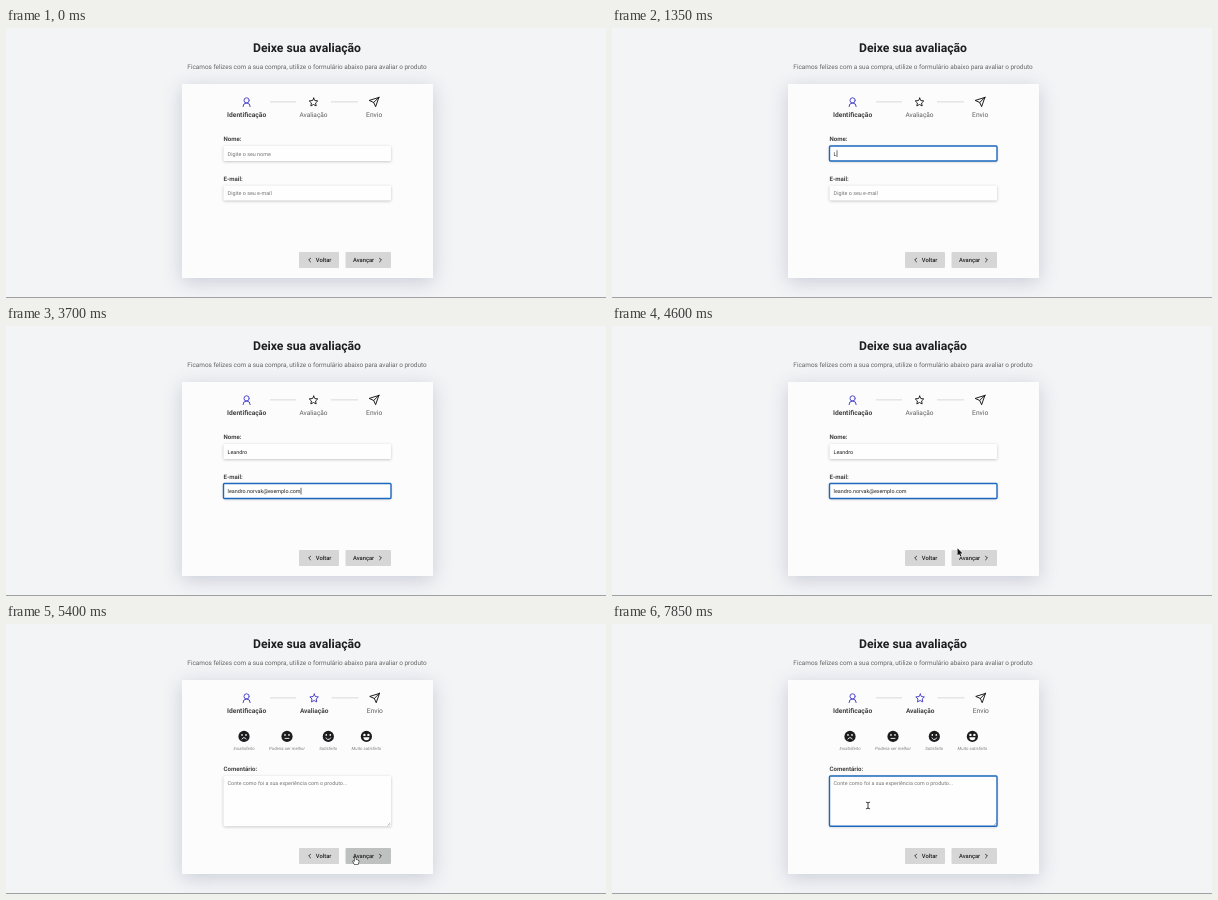
Write an HTML page with a canvas that moves like this. It is 600x270 px and loops after 8000 ms.

```html
<!DOCTYPE html>
<html lang="pt-BR">
<head>
<meta charset="utf-8">
<title>Avaliação</title>
<style>
html, body { margin: 0; width: 100%; height: 100%; overflow: hidden; background: #f3f4f6; }
canvas { display: block; width: 600px; height: 270px; }
</style>
</head>
<body>
<canvas id="stage"></canvas>
<script>
const LOOP = 8000, TICK = 50, W = 600, H = 270;
const FONT = 'Roboto, "Open Sans", sans-serif';
const BLUE = '#3b35c9', INK = '#1c1c1e', PAPER = '#fcfcfc', FOCUS = '#1c68bd';
const canvas = document.getElementById('stage');
const dpr = window.devicePixelRatio || 1;
canvas.width = W * dpr;
canvas.height = H * dpr;
const ctx = canvas.getContext('2d');
ctx.scale(dpr, dpr);
ctx.textRendering = 'geometricPrecision';

const NAME = 'Leandro', EMAIL = 'leandro.norvak@exemplo.com';
const KEYS = [1350, 1800, 1950, 2150, 2400, 2600, 2700];
const T = { nameFocus: 700, mailFocus: 2850, mailFill: 3700, blur: 4900, next: 5150, noteFocus: 6350 };

const FIELD = { x: 217.5, w: 167.5 };
const BACK = { x: 293, y: 224, w: 40, h: 16 };
const NEXT = { x: 339.5, y: 224, w: 45.5, h: 16 };

// Pointer stops: time, x, y
const PATH = [
  [100, 406, 256], [200, 345, 162], [300, 283, 124], [450, 283, 124], [650, 267, 126],
  [3950, 267, 126], [4800, 358.3, 238], [5350, 358.3, 238], [5600, 271, 190],
  [5800, 271, 190], [6250, 256, 181.5]
];

function text(str, x, y, size, color, style = '', align = 'left') {
  ctx.font = `${style} ${size}px ${FONT}`;
  ctx.textAlign = align;
  ctx.fillStyle = color;
  ctx.fillText(str, x, y);
  return ctx.measureText(str).width;
}

function box(x, y, w, h, fill, radius = 0, shadow) {
  ctx.save();
  if (shadow) {
    ctx.shadowColor = shadow.color;
    ctx.shadowBlur = shadow.blur * dpr;
    ctx.shadowOffsetY = shadow.dy * dpr;
  }
  ctx.fillStyle = fill;
  ctx.beginPath();
  ctx.roundRect(x, y, w, h, radius);
  ctx.fill();
  ctx.restore();
}

function poly(points, closed) {
  ctx.beginPath();
  points.forEach(([x, y]) => ctx.lineTo(x, y));
  if (closed) ctx.closePath();
}

function stroke(color, width) {
  ctx.strokeStyle = color;
  ctx.lineWidth = width;
  ctx.stroke();
}

function at(x, y, scale, draw) {
  ctx.save();
  ctx.translate(x, y);
  ctx.scale(scale, scale);
  ctx.lineJoin = ctx.lineCap = 'round';
  draw();
  ctx.restore();
}

function userIcon(x, y) {
  at(x, y, 1, () => {
    ctx.beginPath();
    ctx.arc(0, -1.6, 2.6, 0, Math.PI * 2);
    stroke(BLUE, 0.9);
    ctx.beginPath();
    ctx.arc(0, 4.6, 3.6, Math.PI, 0);
    stroke(BLUE, 0.9);
  });
}

function starIcon(x, y, color) {
  const points = Array.from({ length: 10 }, (_, i) => {
    const r = i % 2 ? 2.2 : 4.5, a = i * Math.PI / 5 - Math.PI / 2;
    return [r * Math.cos(a), r * Math.sin(a)];
  });
  at(x, y + 0.3, 1, () => {
    poly(points, true);
    stroke(color, 0.9);
  });
}

function planeIcon(x, y) {
  at(x, y, 0.47, () => {
    poly([[10, -10], [3, 10], [-1, 1], [-10, -3]], true);
    stroke('#111', 2);
    poly([[10, -10], [-1, 1]]);
    stroke('#111', 2);
  });
}

function face(x, mood) {
  at(x, 112.4, 1, () => {
    const dot = (cx, cy, r) => {
      ctx.beginPath();
      ctx.arc(cx, cy, r, 0, Math.PI * 2);
      ctx.fill();
    };
    ctx.fillStyle = INK;
    dot(0, 0, 5.6);
    ctx.fillStyle = PAPER;
    const big = mood === 2;
    dot(-2, -1.5, big ? 1.2 : 0.85);
    dot(2, -1.5, big ? 1.2 : 0.85);
    ctx.beginPath();
    if (big) {
      ctx.arc(0, 0.8, 3, 0, Math.PI);
      ctx.fill();
      return;
    }
    if (mood < 0) ctx.arc(0, 3.7, 2.4, Math.PI * 1.15, Math.PI * 1.85);
    else if (mood > 0) ctx.arc(0, 0.6, 2.5, Math.PI * 0.12, Math.PI * 0.88);
    else { ctx.moveTo(-2, 2); ctx.lineTo(2, 2); }
    stroke(PAPER, 0.9);
  });
}

function field(y, h, focused) {
  box(FIELD.x, y, FIELD.w, h, '#fefefe', 1, { color: 'rgba(0,0,0,.24)', blur: 3, dy: 0.8 });
  if (!focused) return;
  ctx.beginPath();
  ctx.roundRect(FIELD.x, y, FIELD.w, h, 1);
  stroke(FOCUS, 1.4);
}

function caret(x, y, since) {
  if (since % 1000 < 500) box(x, y, 0.6, 6.8, '#111');
}

function input(label, y, hint, value, focused, since) {
  text(label, 217.5, y - 5, 6.1, '#444', 'bold');
  field(y, 15, focused);
  const w = text(value || hint, 221.6, y + 9.9, 5.4, value ? '#222' : '#757575');
  if (focused) caret(221.6 + (value ? w + 0.2 : 0), y + 4.2, since);
}

function inside(p, r) {
  return p && p.x >= r.x && p.x <= r.x + r.w && p.y >= r.y && p.y <= r.y + r.h;
}

function button(r, label, textX, chevronX, dir, hover) {
  box(r.x, r.y, r.w, r.h, hover ? '#bfc1c0' : '#d6d6d6', 1);
  text(label, textX, 234.4, 5.8, '#222', '500');
  at(chevronX, 232, 1, () => {
    poly([[-0.9 * dir, -1.8], [0.9 * dir, 0], [-0.9 * dir, 1.8]]);
    stroke('#222', 0.9);
  });
}

function pointer(t) {
  if (t < 100 || (t >= KEYS[0] && t < 4000)) return null;
  const i = PATH.findIndex(k => k[0] > t);
  if (i < 0) {
    const [, x, y] = PATH[PATH.length - 1];
    return { x, y };
  }
  const [t0, x0, y0] = PATH[i - 1], [t1, x1, y1] = PATH[i];
  let u = (t - t0) / (t1 - t0);
  if (t1 > 300) u = u * u * (3 - 2 * u);
  return { x: x0 + (x1 - x0) * u, y: y0 + (y1 - y0) * u };
}

function beam() {
  const shape = () => {
    ctx.beginPath();
    for (const s of [-1, 1]) {
      ctx.moveTo(-1.7, s * 3.3);
      ctx.quadraticCurveTo(0, s * 3.3, 0, s * 2.3);
      ctx.quadraticCurveTo(0, s * 3.3, 1.7, s * 3.3);
    }
    ctx.moveTo(0, -2.5);
    ctx.lineTo(0, 2.5);
  };
  shape();
  stroke('rgba(255,255,255,.8)', 1.6);
  shape();
  stroke('#111', 0.8);
}

function outlined(points, fill, edge) {
  poly(points, true);
  stroke(edge, 1.1);
  ctx.fillStyle = fill;
  ctx.fill();
}

function cursor(p, kind) {
  at(p.x, p.y, 1, () => {
    if (kind === 'beam') beam();
    else if (kind === 'hand') {
      outlined([[-0.6, 0.2], [0.5, 0.2], [0.6, 2.8], [2.6, 3.2], [3.5, 3.9], [3.4, 5.6],
        [2.7, 7.3], [-0.6, 7.3], [-2.2, 4.8], [-1.9, 4], [-0.6, 4.8]], '#fff', '#111');
    } else {
      outlined([[0, 0], [0, 7.2], [1.7, 5.7], [2.8, 8.2], [3.9, 7.7], [2.8, 5.3], [5, 5.2]], '#111', '#fff');
    }
  });
}

function header(second) {
  text('Deixe sua avaliação', 301, 24.3, 12.2, '#1d1e20', 'bold', 'center');
  text('Ficamos felizes com a sua compra, utilize o formulário abaixo para avaliar o produto',
    301, 40.7, 6.42, '#666', '', 'center');
  box(176, 56, 251, 194, PAPER, 0, { color: 'rgba(60,70,110,.22)', blur: 18, dy: 4 });

  const shift = second ? 0.6 : 0;
  userIcon(240.6, 74);
  starIcon(307.5 + shift, 74, second ? BLUE : '#111');
  planeIcon(368.2 + shift, 74);
  box(264, 73.5, 26, 0.8, '#cfcfcf');
  box(325 + shift, 73.5, 27, 0.8, '#cfcfcf');
  text('Identificação', 240.6, 88.8, 6.7, '#444', 'bold', 'center');
  text('Avaliação', 307.5 + shift, 88.8, 6.5, second ? '#444' : '#5f5f5f', second ? 'bold' : '', 'center');
  text('Envio', 368.2 + shift, 88.8, 6.7, '#5f5f5f', '', 'center');
}

function identity(t) {
  const typed = KEYS.filter(k => k <= t);
  const lastKey = typed.length ? typed[typed.length - 1] : T.nameFocus;
  const filled = t >= T.mailFill;
  input('Nome:', 118, 'Digite o seu nome', NAME.slice(0, typed.length),
    t >= T.nameFocus && t < T.mailFocus, t - lastKey);
  input('E-mail:', 157.5, 'Digite o seu e-mail', filled ? EMAIL : '',
    t >= T.mailFocus && t < T.blur, t - (filled ? T.mailFill : T.mailFocus));
}

function review(t) {
  const moods = [[238, -1, 'Insatisfeito'], [281, 0, 'Poderia ser melhor'],
    [322.3, 1, 'Satisfeito'], [360.4, 2, 'Muito satisfeito']];
  for (const [x, mood, label] of moods) {
    face(x, mood);
    text(label, x, 126.1, 4.4, '#808080', 'italic', 'center');
  }
  text('Comentário:', 217.5, 146.6, 6.1, '#444', 'bold');
  const focused = t >= T.noteFocus;
  field(152, 50.3, focused);
  text('Conte como foi a sua experiência com o produto...', 221.6, 161.4, 5.35, '#757575');
  for (const d of [1.4, 2.9]) {
    poly([[384.3 - d, 201.6], [384.3, 201.6 - d]]);
    stroke('#888', 0.5);
  }
  if (focused) caret(221.6, 155.8, t - T.noteFocus);
}

function draw(t) {
  const second = t >= T.next;
  const p = pointer(t);
  ctx.fillStyle = '#f3f4f6';
  ctx.fillRect(0, 0, W, H);
  header(second);
  if (second) review(t);
  else identity(t);
  const hover = inside(p, NEXT);
  button(BACK, 'Voltar', 309.8, 303.6, -1, inside(p, BACK));
  button(NEXT, 'Avançar', 347, 374.5, 1, hover);
  box(0, 269, W, 1, '#a0a1a3');

  if (!p) return;
  const fields = second ? [[152, 50.3]] : [[118, 15], [157.5, 15]];
  const overField = fields.some(([y, h]) => inside(p, { ...FIELD, y, h }));
  cursor(p, overField ? 'beam' : hover || inside(p, BACK) ? 'hand' : 'arrow');
}

function frame() {
  const t = performance.now() % LOOP;
  draw(Math.floor(t / TICK) * TICK);
  requestAnimationFrame(frame);
}
frame();
</script>
</body>
</html>
```
